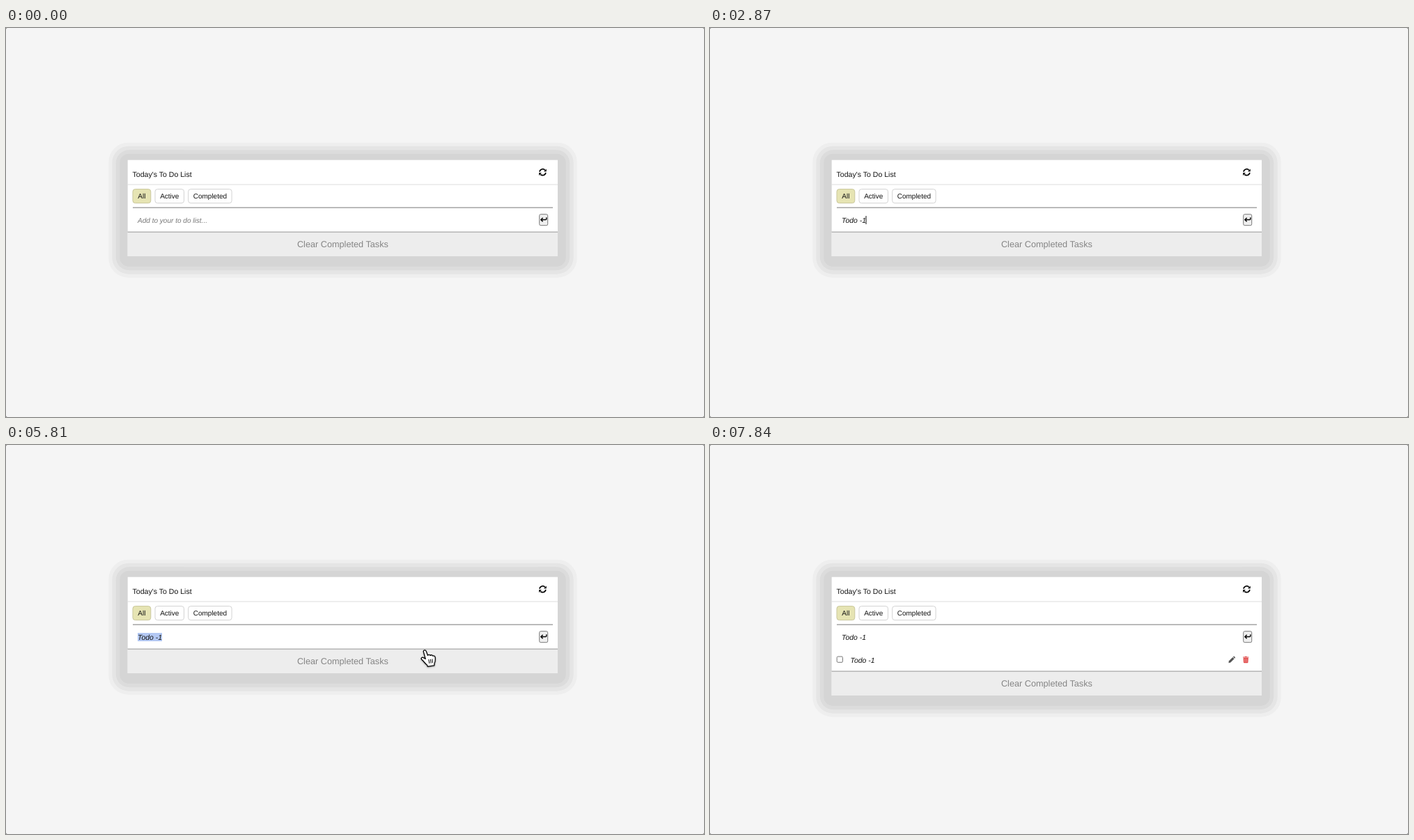
An HTML page for the animation above (8000 ms loop, 1002 by 559 pixels).

```html
<!DOCTYPE html>
<html lang="en">
<head>
<meta charset="utf-8">
<title>To do list</title>
<style>
  html, body { margin: 0; width: 100%; height: 100%; overflow: hidden; background: #666; }
  svg { display: block; width: 1002px; height: 559px; }
  text {
    font-family: "Liberation Sans", Helvetica, Arial, sans-serif;
    text-rendering: geometricPrecision;
    white-space: pre;
    fill: #111;
  }
  .title { font-size: 10.55px; }
  .tab { font-size: 10px; text-anchor: middle; }
  .hint { font-size: 10.05px; font-style: italic; fill: #777; }
  .entry { font-size: 10.45px; font-style: italic; }
  .clear { font-size: 12.7px; text-anchor: middle; fill: #858585; }
  .box { fill: #fff; stroke: #d3d3d3; }
</style>
</head>
<body>
<svg viewBox="0 0 1002 559">
  <rect width="1002" height="559" rx="2" fill="#f5f5f5"/>
  <g id="shadow"></g>
  <rect id="card" x="174.7" y="189.7" width="617.3" fill="#fff"/>

  <text class="title" x="181.6" y="214">Today's To Do List</text>
  <g transform="translate(764.9 201.7) scale(.69)">
    <g id="half">
      <path d="M1.6 7A6.5 6.5 0 0 1 12.7 3.5" fill="none" stroke="#000" stroke-width="2.5"/>
      <path d="M15.7 1.2V6.7H10.2Z"/>
    </g>
    <use href="#half" transform="rotate(180 8 8)"/>
  </g>
  <rect x="174.7" y="224.5" width="617.3" height="1" fill="#ddd"/>

  <rect class="box" x="182" y="231.6" width="25.8" height="20" rx="3.5" style="fill:#e6e4b3;stroke:#c9c79c"/>
  <rect class="box" x="214" y="231.6" width="41.5" height="20" rx="3.5"/>
  <rect class="box" x="261.7" y="231.6" width="62.4" height="20" rx="3.5"/>
  <text class="tab" x="194.9" y="245.3">All</text>
  <text class="tab" x="234.8" y="245.3">Active</text>
  <text class="tab" x="292.9" y="245.3">Completed</text>
  <rect x="182" y="257.6" width="603" height="1" fill="#777"/>

  <rect id="selection" y="270" height="12" fill="#b3c8f3"/>
  <text class="hint" id="hint" x="189" y="279.5">Add to your to do list...</text>
  <text class="entry" id="value" x="189" y="279.5">Todo -1</text>
  <rect id="caret" y="270" width="1" height="12" fill="#111"/>

  <rect x="765.7" y="267.7" width="12" height="16" rx="2" fill="#efefef" stroke="#777"/>
  <path d="M775.8 272.2V274.3Q775.8 275.5 774.6 275.5H768.3M770.6 272.8L767.9 275.5L770.6 278.2" fill="none" stroke="#000" stroke-width="1.4"/>

  <g id="item">
    <rect x="182.2" y="304" width="8.3" height="8.3" rx="1.5" fill="#fff" stroke="#767676"/>
    <text class="entry" x="201.6" y="312.5">Todo -1</text>
    <g fill="#555">
      <path d="M744.4 313.2L745 310.3L750.3 305L752.6 307.3L747.3 312.6Z"/>
      <path d="M750.9 304.4L751.6 303.8Q752.1 303.4 752.6 303.8L753.8 305Q754.2 305.5 753.8 306L753.2 306.7Z"/>
    </g>
    <g fill="#e04848">
      <path d="M765 304.4H767.5L768 303.7H770.4L770.9 304.4H773.4V305.5H765Z"/>
      <path d="M765.6 306H772.8L772.4 312.4Q772.3 313.2 771.5 313.2H766.9Q766.1 313.2 766 312.4Z"/>
      <path d="M767.5 307.2V312M769.2 307.2V312M770.9 307.2V312" stroke="#f6b5b5" stroke-width=".6"/>
    </g>
  </g>

  <g id="footer">
    <rect x="174.7" y="292.7" width="617.3" height="1" fill="#777"/>
    <rect x="174.7" y="293.7" width="617.3" height="34.3" fill="#ededed"/>
    <text class="clear" x="483.4" y="315.3">Clear Completed Tasks</text>
  </g>

  <g id="hand" stroke="#000" stroke-linecap="round" stroke-linejoin="round" style="filter:drop-shadow(0 1px 1px rgba(0,0,0,.35))">
    <path fill="#fff" stroke-width="1.3" d="M599.4 297.4C598.7 294.5 602.3 293.9 603.2 296.4L605.4 302.3C606.4 300.9 608.5 301.1 609 302.5C610 301.3 612.2 301.6 612.6 303.1C614.5 302.3 616 303.6 616.2 305.6C616.5 309 616.6 311 615 314L614.8 316.8L605.3 318.3L604.5 316.2C601.5 314.2 600 311 597 308.6C595 306.6 597 304.4 599.4 305.6L602.2 307.4Z"/>
    <path fill="none" stroke-width="1" d="M606.9 308.4L607.7 313.4M609.5 308.2L610.1 313.1M612 307.9L612.4 312.7"/>
  </g>
</svg>
<script>
const LOOP = 8000, LEFT = 189, GROW = 32;
const $ = id => document.getElementById(id);
const el = Object.fromEntries(
  ["shadow", "card", "selection", "hint", "value", "caret", "item", "footer", "hand"].map(id => [id, $(id)]));
const WORD = "Todo -1";

// time, typed characters, caret shown, first selected character
const STEPS = [
  [0, 0, 0, 7], [140, 0, 1, 7], [210, 1, 1, 7], [490, 2, 1, 7], [770, 3, 1, 7],
  [910, 4, 1, 7], [1400, 5, 1, 7], [1680, 6, 1, 7], [1820, 7, 1, 7],
  [2310, 7, 0, 7], [2870, 7, 1, 7], [3360, 7, 0, 7],
  [3500, 7, 0, 6], [3990, 7, 0, 5], [4060, 7, 0, 4], [4130, 7, 0, 3],
  [4270, 7, 0, 2], [4340, 7, 0, 1], [4410, 7, 0, 0],
  [6440, 0, 1, 7], [6930, 0, 0, 7], [7280, 7, 1, 7], [7840, 7, 0, 7]
];

// inset from the outermost edge, radius, colour
const BANDS = [[0, 28, "#eeeeee"], [5, 24, "#e5e5e5"], [10.5, 19, "#dcdcdc"], [16, 13, "#d5d5d5"]];

function set(node, attrs) {
  for (const key in attrs) node.setAttribute(key, attrs[key]);
}
const show = (node, on) => node.style.display = on ? "" : "none";

const bands = BANDS.map(([inset, rx, fill]) => {
  const rect = document.createElementNS("http://www.w3.org/2000/svg", "rect");
  set(rect, { x: 147.3 + inset, y: 164.7 + inset, width: 672.4 - 2 * inset, rx, fill });
  el.shadow.append(rect);
  return rect;
});

const stops = [...WORD].map((_, i) => el.value.getSubStringLength(0, i + 1));
stops.unshift(0);

function draw(t) {
  const [, count, caret, from] = STEPS.findLast(step => step[0] <= t);
  const added = t >= 6440;
  const extra = added ? GROW : 0;

  el.value.textContent = WORD.slice(0, count);
  show(el.hint, !count);
  show(el.caret, caret);
  set(el.caret, { x: LEFT - 0.5 + stops[count] });
  set(el.selection, { x: LEFT + stops[from], width: stops[7] - stops[from] });

  show(el.item, added);
  show(el.hand, t >= 5810 && !added);
  set(el.footer, { transform: `translate(0 ${extra})` });
  set(el.card, { height: 138.3 + extra });
  bands.forEach((rect, i) => set(rect, { height: 194 + extra - 2 * BANDS[i][0] }));
}

const start = performance.now();
function tick() {
  draw((performance.now() - start) % LOOP);
  requestAnimationFrame(tick);
}
tick();
</script>
</body>
</html>
```
